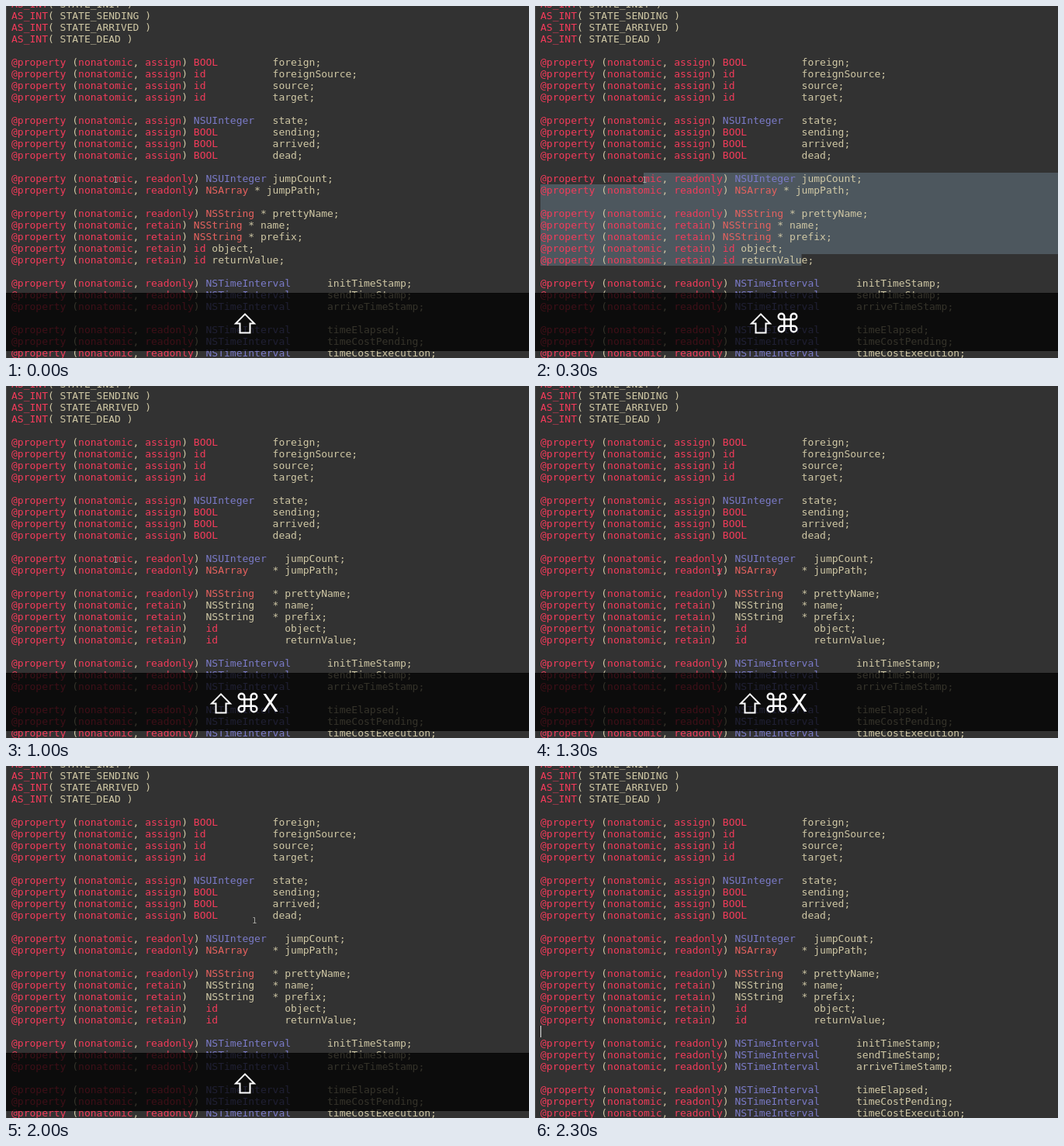
An HTML page for the animation above (2400 ms loop, 674 by 454 pixels).

```html
<!DOCTYPE html>
<html lang="en">
<head>
<meta charset="utf-8">
<title>Aligning declarations</title>
<style>
html, body { margin: 0; width: 100%; height: 100%; overflow: hidden; background: #323232; }
#stage { position: absolute; left: 0; top: 0; width: 674px; height: 454px; overflow: hidden; background: #323232; }
#stage > * { position: absolute; }
#edge { left: 0; top: 0; width: 1px; height: 454px; background: #4a4a4a; }
pre { left: 7px; margin: 0; font: 13px/15px "DejaVu Sans Mono", monospace; color: #d0c8a5; }
.key { color: #f43b5a; }
.cls { color: #e6625f; }
.num { color: #7b7bc9; }
svg { left: 0; top: 0; }

.anim { animation: 2400ms step-end infinite; }
#raw { animation-name: raw; }
#plain { animation-name: plain; }
#tinted { animation-name: tinted; }
#sel { animation-name: sel; }
#caret { animation-name: caret; left: 7px; top: 335px; width: 1px; height: 15px; background: #e4e4e4; }
#hud { animation-name: hud; }
#shift { animation-name: shift; }
#shiftCmd { animation-name: shiftCmd; }
#shiftCmdX { animation-name: shiftCmdX; }
#mouse { animation-name: mouse; }

@keyframes raw { 0% { opacity: 1 } 20.82%, 100% { opacity: 0 } }
@keyframes plain { 0% { opacity: 0 } 20.82% { opacity: 1 } 37.49%, 100% { opacity: 0 } }
@keyframes tinted { 0% { opacity: 0 } 37.49%, 100% { opacity: 1 } }
@keyframes sel { 0% { opacity: 0 } 4.16% { opacity: 1 } 20.82%, 100% { opacity: 0 } }
@keyframes caret {
  0% { opacity: 0 } 20.82% { opacity: 1 } 41.66% { opacity: 0 } 58.32% { opacity: 1 }
  70.82% { opacity: 0 } 87.49%, 100% { opacity: 1 }
}
@keyframes hud { 0% { opacity: 1 } 87.49% { opacity: .5 } 91.66% { opacity: .08 } 95.82%, 100% { opacity: 0 } }
@keyframes shift { 0% { opacity: 1 } 12.49% { opacity: 0 } 83.32%, 100% { opacity: 1 } }
@keyframes shiftCmd { 0% { opacity: 0 } 12.49% { opacity: 1 } 20.82%, 100% { opacity: 0 } }
@keyframes shiftCmdX { 0% { opacity: 0 } 20.82% { opacity: 1 } 83.32%, 100% { opacity: 0 } }
@keyframes mouse {
  0% { transform: translate(141px, 224px) }
  49.99% { transform: translate(170px, 232px) }
  54.16% { transform: translate(237px, 239px) }
  58.32% { transform: translate(340px, 234px) }
  62.49% { transform: translate(430px, 222px) }
  66.66% { transform: translate(395px, 211px) }
  70.82% { transform: translate(335px, 200px) }
  74.99% { transform: translate(320px, 199px) }
  91.66% { transform: translate(368px, 209px) }
  95.82%, 100% { transform: translate(418px, 223px) }
}
</style>
</head>
<body>
<div id="stage">
  <div id="edge"></div>
  <svg id="sel" class="anim" width="674" height="454">
    <path fill="#4d575e" d="M140 215H674V320H343.5V335H7V230H140Z"/>
  </svg>
  <pre id="head" style="top:-10px"></pre>
  <pre id="raw" class="anim" style="top:215px"></pre>
  <pre id="plain" class="anim" style="top:215px"></pre>
  <pre id="tinted" class="anim" style="top:215px"></pre>
  <pre id="tail" style="top:350px"></pre>
  <div id="caret" class="anim"></div>
  <svg width="674" height="454">
    <path id="mouse" class="anim" fill="none" stroke="#a5a5a0" d="M-1.5 -3.5H.5V3.5M-1.5 3.5H2.5"/>
  </svg>
  <svg id="hud" class="anim" width="674" height="454">
    <defs>
      <path id="up" d="M0-11.6L12 .5H6.5V12.5H-6.5V.5H-12Z" stroke-width="2"/>
      <path id="cmd" stroke-width="2.4" d="M-4.2-8a3.8 3.8 0 1 0-3.8 3.8H8a3.8 3.8 0 1 0-3.8-3.8V8a3.8 3.8 0 1 0 3.8-3.8H-8a3.8 3.8 0 1 0 3.8 3.8Z"/>
    </defs>
    <path fill="#000" fill-opacity=".75" d="M0 370H674V445H0Z"/>
    <path fill="#000" fill-opacity=".3" d="M0 370H674V371H0ZM0 444H674V445H0Z"/>
    <g fill="none" stroke="#fff">
      <g id="shift" class="anim"><use href="#up" x="308" y="409"/></g>
      <g id="shiftCmd" class="anim"><use href="#up" x="291" y="409"/><use href="#cmd" x="325.5" y="408.5"/></g>
      <g id="shiftCmdX" class="anim">
        <use href="#up" x="277" y="409"/><use href="#cmd" x="311.5" y="408.5"/>
        <text x="340.5" y="420" text-anchor="middle" fill="#fff" stroke="none" font-size="32" font-family="DejaVu Sans, sans-serif">X</text>
      </g>
    </g>
  </svg>
</div>
<script>
const KEYS = /@property|\b(?:nonatomic|assign|readonly|retain|BOOL|id|AS_INT)\b/;
const CLASSES = /\bNS(?:Array|String)\b/;
const NUMBERS = /\bNS(?:UInteger|TimeInterval)\b/;
const TOKENS = new RegExp([KEYS, CLASSES, NUMBERS].map(r => `(${r.source})`).join("|"), "g");

function paint(line, types = true) {
  return line.replace(TOKENS, (word, key, cls) => {
    if (!key && !types) return word;
    return `<span class="${key ? "key" : cls ? "cls" : "num"}">${word}</span>`;
  });
}

// Declares a property with the type and name starting at fixed columns.
function prop(access, type, name, typeCol = 0, nameCol = 0) {
  if (!name) return "";
  let line = `@property (nonatomic, ${access}) `.padEnd(typeCol) + type + " ";
  const star = name.startsWith("*");
  return line.padEnd(star ? nameCol - 2 : nameCol) + name + ";";
}

function fill(id, lines, typed = () => true) {
  document.getElementById(id).innerHTML = lines.map((s, i) => paint(s, typed(i))).join("\n");
}

const macros = ["INIT", "SENDING", "ARRIVED", "DEAD"].map(s => `AS_INT( STATE_${s} )`);
const assigned = [
  ["BOOL", "foreign"], ["id", "foreignSource"], ["id", "source"], ["id", "target"], [],
  ["NSUInteger", "state"], ["BOOL", "sending"], ["BOOL", "arrived"], ["BOOL", "dead"]
].map(([type, name]) => prop("assign", type, name, 30, 43));

const block = [
  ["readonly", "NSUInteger", "jumpCount"],
  ["readonly", "NSArray", "* jumpPath"],
  [],
  ["readonly", "NSString", "* prettyName"],
  ["retain", "NSString", "* name"],
  ["retain", "NSString", "* prefix"],
  ["retain", "id", "object"],
  ["retain", "id", "returnValue"]
];
const aligned = block.map(row => prop(...row.concat(row.length ? [32, 45] : [])));

const times = ["initTimeStamp", "sendTimeStamp", "arriveTimeStamp", "",
  "timeElapsed", "timeCostPending", "timeCostExecution"
].map(name => prop("readonly", "NSTimeInterval", name, 32, 52));

fill("head", [...macros, "", ...assigned]);
fill("raw", block.map(row => prop(...row)));
fill("plain", aligned, () => false);
fill("tinted", aligned, i => i < 4);
fill("tail", times);
</script>
</body>
</html>
```
